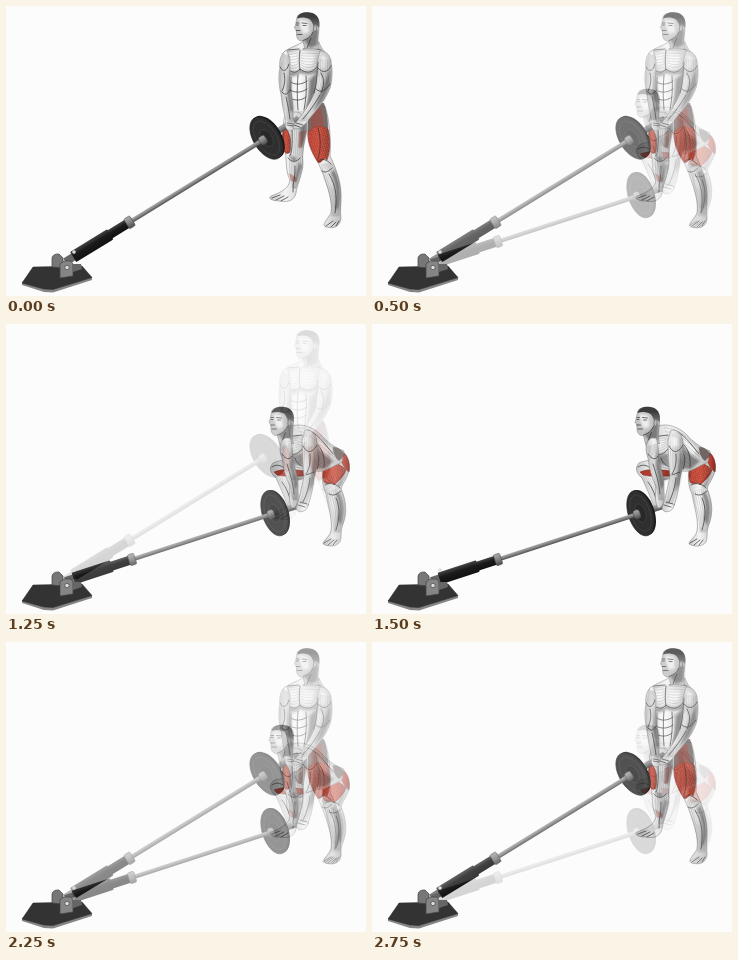
Write an HTML page that moves like this. It is 360x290 px and loops after 3000 ms.

```html
<!DOCTYPE html>
<html lang="en">
<head>
<meta charset="utf-8">
<title>Landmine squat</title>
<style>
  html, body { margin: 0; width: 100%; height: 100%; overflow: hidden; background: #fcfcfc; }
  svg { display: block; width: 100vw; height: 100vh; }
  .paper { fill: #fcfcfc; }
  .skin { fill: url(#skin); stroke: #888; stroke-width: .6; stroke-linejoin: round; }
  .fibre, .line { fill: none; stroke: #555; stroke-width: .4; opacity: .5; stroke-linecap: round; }
  .line { stroke: #2c2c2c; stroke-width: .9; opacity: .75; }
  .shade { fill: #222; opacity: .45; filter: url(#soft); }
  .light { fill: #fff; opacity: .7; filter: url(#soft); }
  .red { fill: url(#blood); stroke: #6f2b25; stroke-width: .5; }
  .mesh { fill: url(#mesh); }
  .shorts { fill: #5d4d4b; opacity: .8; }
  #standing { animation: mix 3s steps(6) infinite; }
  @keyframes mix { 0%, 100% { opacity: 1; } 50% { opacity: 0; } }
</style>
</head>
<body>
<svg viewBox="0 0 360 290" preserveAspectRatio="none">
  <defs>
    <linearGradient id="skin">
      <stop offset="0" stop-color="#c6c6c6"/>
      <stop offset=".4" stop-color="#f4f4f4"/>
      <stop offset="1" stop-color="#bdbdbd"/>
    </linearGradient>
    <linearGradient id="blood">
      <stop offset="0" stop-color="#a8372b"/>
      <stop offset=".5" stop-color="#c2402f"/>
      <stop offset="1" stop-color="#7d2c25"/>
    </linearGradient>
    <linearGradient id="hair" x2="0" y2="1">
      <stop offset=".3" stop-color="#3c3c3c"/>
      <stop offset="1" stop-color="#777"/>
    </linearGradient>
    <linearGradient id="steel" x2="0" y2="1">
      <stop offset="0" stop-color="#aaa"/>
      <stop offset=".45" stop-color="#888"/>
      <stop offset="1" stop-color="#4c4c4c"/>
    </linearGradient>
    <linearGradient id="rubber" x2="0" y2="1">
      <stop offset="0" stop-color="#454545"/>
      <stop offset=".4" stop-color="#1b1b1b"/>
      <stop offset="1" stop-color="#111"/>
    </linearGradient>
    <pattern id="mesh" width="3" height="3" patternUnits="userSpaceOnUse" patternTransform="rotate(25)">
      <path d="M0 0L3 3M3 0L0 3" stroke="#e58a78" stroke-width=".35"/>
    </pattern>
    <filter id="soft" x="-50%" y="-50%" width="200%" height="200%"><feGaussianBlur stdDeviation=".9"/></filter>

    <g id="head">
      <path class="skin" style="fill:#c4c4c4" d="M291 12C290 16 290 18 288.500 22L290.500 24L290.500 29C291 33 293 35.500 297 35L299 43L313 43C311 36 312 30 313 22C314 12 308 7 300 7C294 7 291 9 291 12Z"/>
      <path class="shade" d="M298 34C304 32 307 27 308 23L312 24L311 39L304 42Z"/>
      <path class="light" d="M293 13L302 15L303 26L297 28L294 20Z"/>
      <path fill="url(#hair)" d="M291 12.500C292 7 299 5.500 304 6.500C311 7.500 315 13 313 22L311 20L309 18.500L307.500 21C307 17 305 14 303 13C299 11 295 11 291 12.500Z"/>
      <path class="line" d="M290.500 17L293 17M296 17L301 17.500M290.500 19L292.500 19M297 19.500L300 19.500M290 24.500L294 24.500M291.500 28.500L296 28.500M297 34.500C303 33 306 29 307 26M305 32L301 42"/>
      <ellipse cx="309" cy="22.500" rx="1.600" ry="3" fill="#bbb" stroke="#555" stroke-width=".6"/>
    </g>

    <g id="barbell">
      <rect x="231" y="-3.200" width="37" height="6.400" rx="1" fill="url(#steel)"/>
      <ellipse cx="232.500" rx="13" ry="23.500" fill="#1a1a1a"/>
      <ellipse cx="230.500" rx="13" ry="23.500" fill="#2f2f2f" stroke="#222" stroke-width=".6"/>
      <ellipse cx="230.500" rx="10" ry="19" fill="none" stroke="#444" stroke-width=".7"/>
      <ellipse cx="230.500" rx="5.500" ry="9.500" fill="#282828" stroke="#444" stroke-width=".7"/>
      <rect x="74" y="-2.200" width="153" height="4.400" fill="url(#steel)"/>
      <rect x="223" y="-4.500" width="7" height="9" rx="2.500" fill="url(#steel)" stroke="#444" stroke-width=".5"/>
      <rect x="-3" y="-4" width="14" height="8" fill="#666"/>
      <rect x="47" y="-4.700" width="24" height="9.400" fill="url(#rubber)"/>
      <rect x="6" y="-6" width="43" height="12" rx="1" fill="url(#rubber)"/>
      <rect x="68" y="-5.700" width="7" height="11.400" rx="1.500" fill="url(#steel)" stroke="#444" stroke-width=".5"/>
    </g>

    <g id="base">
      <path fill="#858585" d="M16 276L47 283L86 271V274L47 286.500L38 286L16 279Z"/>
      <path fill="#333" stroke="#2a2a2a" stroke-width=".5" d="M27 261L76 260L86 271.500L47 283.500L38 283L16 277Z"/>
    </g>
    <g id="bracket">
      <path fill="#777" stroke="#444" stroke-width=".7" d="M46 261V252Q47 247.500 53 248L57 252L57 262Z"/>
      <path fill="#858585" stroke="#444" stroke-width=".7" d="M54 272V258L58 255H65L67 258V270Z"/>
      <path fill="#666" d="M66 258L75 258L76 263L67 266Z"/>
      <circle cx="61" cy="261.500" r="2.200" fill="#ddd" stroke="#444" stroke-width=".7"/>
      <circle cx="68" cy="246" r="1.800" fill="#ddd"/>
    </g>
  </defs>

  <g id="squatting">
    <rect class="paper" width="360" height="290"/>
    <use href="#base"/>
    <g>
      <path class="skin" d="M302 138C290 136 274 135 267 139C262 144 265 150 270 154C274 163 278 172 282 182L289 184C292 175 290 165 287 157L304 153Z"/>
      <path class="red" d="M268 148C277 144 291 146 300 147L301 152C290 152 278 153 271 151Z"/>
      <path class="shade" d="M286 153L300 153L288 158L291 174L287 180Z"/>
      <path class="fibre" d="M269 152C274 160 279 170 283 182" data-to="285 156 288 164 290 174 289 182"/>
      <path class="line" d="M266 143C270 140 275 141 278 144M276 158C281 164 283 172 286 180"/>
    </g>
    <g>
      <path class="skin" d="M325 124C337 123 344 134 343 147C341 155 336 160 335 165C341 178 341 190 337 200C334 207 336 214 334 218C330 223 322 223 317 220C317 216 324 213 325 207C327 196 322 182 320 170C315 160 316 148 318 138Z"/>
      <path class="red" d="M332 125C341 128 345 138 343 148C338 145 334 136 332 125Z"/>
      <path class="red" d="M320 142C326 136 335 140 340 146C338 152 333 157 328 161C326 156 322 162 318 158C316 151 317 146 320 142Z"/>
      <path class="mesh" d="M320 142C326 136 335 140 340 146L328 160L318 157Z"/>
      <path class="shade" d="M321 138C327 132 333 133 336 138L325 141ZM336 154L340 148L334 163L330 163ZM333 168C339 178 339 190 335 202L332 195C335 185 333 175 330 170Z"/>
      <path class="light" d="M323 164L329 168L329 190L325 182Z"/>
      <path class="fibre" d="M321 167C322 180 328 190 328 208" data-to="335 164 340 178 341 193 334 208"/>
      <path class="line" d="M319 161C324 158 331 160 334 164M323 170C329 173 332 169 335 167M330 174C335 185 333 196 330 206M318 219L325 215M322 221L328 216M327 221L331 216"/>
    </g>
    <g>
      <path class="skin" d="M286 102C296 99 306 103 314 110C321 118 328 123 338 127L336 138L320 146C312 149 305 146 298 144C288 145 280 138 277 128C273 120 271 115 278 111Z"/>
      <path class="shade" d="M311 120C315 128 322 134 328 137L319 145L306 145ZM284 132L296 129L298 142L288 141Z"/>
      <path class="shorts" d="M327 123C332 123 336 126 339 131L333 137C329 134 327 129 327 123Z"/>
      <path class="light" d="M279 117L292 115L290 125L281 126ZM312 112L325 125L321 131L313 124Z"/>
      <path class="fibre" d="M292 104C308 103 318 117 331 128" data-to="300 130 306 135 314 143 320 145"/>
      <path class="fibre" d="M277 117C282 114 290 116 297 112" data-to="280 130 286 134 293 131 298 124"/>
      <path class="line" d="M279 127C285 134 294 130 298 122M280 113L296 111M289 134C291 141 296 143 301 143M306 108C314 113 319 120 327 130M312 121C317 126 319 135 318 143M307 124C314 130 314 137 311 145"/>
    </g>
    <use href="#head" x="-25.500" y="76.500"/>
    <use href="#barbell" transform="translate(62 256.300) rotate(-18) scale(.942 1)"/>
    <g>
      <path class="skin" d="M279 114C273 118 273 126 276 134C277 144 280 154 284 162C283 172 283 178 286 184C291 184 293 176 292 168C292 156 290 146 287 138C286 130 287 120 284 114Z"/>
      <path class="fibre" d="M276 122C276 138 282 152 287 176" data-to="285 120 285 138 292 152 291 176"/>
      <path class="shade" d="M285 122L287 138L292 160L289 166L284 142Z"/>
      <path class="line" d="M276 130C280 136 284 136 286 132M281 140C284 150 287 158 288 170"/>
      <path class="skin" d="M299 106C307 105 312 113 311 123C312 136 310 146 308 154C307 166 304 177 301 184C298 189 291 189 290 184C293 176 296 162 298 152C297 142 296 126 296 116Z"/>
      <path class="fibre" d="M299 110C297 130 302 152 294 180" data-to="310 115 312 137 309 156 300 180"/>
      <path class="light" d="M299 112L306 113L306 122L300 123Z"/>
      <path class="shade" d="M309 122L311 138L307 160L303 168L306 145Z"/>
      <path class="line" d="M297 122C302 131 307 128 311 121M304 130C305 138 303 146 300 150M300 151L308 148M304 154C303 164 300 172 297 178M292 181L299 183M294 178L301 180"/>
    </g>
    <use href="#bracket"/>
  </g>

  <g id="standing">
    <rect class="paper" width="360" height="290"/>
    <use href="#base"/>
    <g>
      <path class="skin" d="M281 100C277 115 275 130 278 144C282 150 278 162 284 174C283 182 276 186 265 190C261 193 267 195 275 195C283 197 289 193 290 187C291 178 297 168 297 156C295 146 300 132 303 112Z"/>
      <path class="red" d="M278 122C283 123 286 132 284 146C281 149 278 147 277 142C276 136 276 128 278 122Z"/>
      <path class="mesh" d="M278 122C283 123 286 132 284 146L278 145Z"/>
      <path fill="#c4786c" opacity=".65" d="M293 126L301 124L296 141L292 142ZM283 167L291 172L290 176L285 175Z"/>
      <path class="shade" d="M294 118L302 114L299 130L296 142L294 142ZM293 156L296 160L290 178L288 174ZM283 150L291 152L288 156Z"/>
      <path class="fibre" d="M284 121C286 140 280 158 287 182" data-to="300 121 295 140 300 158 290 182"/>
      <path class="line" d="M286 123C286 134 287 142 284 150M282 152C286 157 291 156 294 152M289 160C290 170 286 178 287 186M266 192L274 189M270 194L278 190M275 195L282 191"/>
    </g>
    <g>
      <path class="skin" d="M300 100L319 100C324 115 325 135 324 150C329 160 335 175 335 189C335 198 334 205 335 213C333 221 328 223 320 221C315 219 321 214 325 207C327 195 321 180 317 168C312 155 303 140 301 122Z"/>
      <path class="shorts" d="M302 98L318 97C321 106 322 114 322 123C316 119 308 121 302 127Z"/>
      <path class="red" d="M302 127C307 119 317 119 322 123C325 134 324 147 321 154C317 149 315 161 311 155C306 147 301 136 302 127Z"/>
      <path class="mesh" d="M302 127C307 119 317 119 322 123C325 134 324 147 321 154L311 153C306 147 301 136 302 127Z"/>
      <path fill="#a5483d" opacity=".6" d="M305 105L315 102L318 119L305 122Z"/>
      <path class="light" d="M317 160L324 166L328 184L324 179Z"/>
      <path class="shade" d="M328 164C334 176 335 188 332 204L329 202C332 188 330 176 325 167Z"/>
      <path class="fibre" d="M315 158C319 176 327 190 326 210" data-to="326 158 335 174 337 193 333 210"/>
      <path class="line" d="M312 156C316 151 321 154 325 158M316 165C320 168 324 164 326 162M323 168C331 181 331 194 329 207M312 122C315 133 315 143 312 153M320 220L327 215M325 221L330 216M330 220L333 215"/>
    </g>
    <g>
      <path class="skin" d="M297 36C290 40 282 42 277 47C278 58 281 68 283 78C282 88 281 96 281 106L303 106C306 98 307 88 310 78C314 68 318 60 321 50C319 45 315 43 313 36Z"/>
      <path class="shade" d="M304 74L312 66L309 84L304 102L300 104L303 90ZM281 64C286 68 292 67 294 63C302 69 309 66 313 59L312 66C303 70 297 68 294 67C290 70 285 71 282 68Z"/>
      <path class="light" d="M282 48L291 47L291 58L284 60ZM297 48L309 49L306 59L297 60ZM287 72L295 71L294 96L287 94Z"/>
      <path class="fibre" d="M280 47C284 44 289 46 293 44" data-to="282 62 286 67 291 66 294 61"/>
      <path class="fibre" d="M294 45C301 44 310 44 319 47" data-to="295 61 301 67 308 65 314 57"/>
      <path class="fibre" d="M302 72C304 80 303 90 300 102" data-to="312 68 310 78 307 92 304 104"/>
      <path class="line" d="M294 44C293 52 293 58 294 64M281 62C286 68 291 67 294 63C302 69 309 66 313 57M292 69C291 81 291 92 292 104M285 71C285 83 284 94 286 104M300 70C301 83 300 93 298 104M285 76C288 79 296 79 301 75M284 84C289 87 295 87 301 83M284 92C289 95 295 95 300 91M282 44L293 43M297 43C303 42 309 42 315 44"/>
    </g>
    <use href="#head"/>
    <use href="#barbell" transform="translate(62 254.200) rotate(-31.600) scale(1.011 1)"/>
    <g>
      <path class="skin" d="M281 44C275 47 273 54 274 62C272 70 273 80 275 88C276 98 278 108 280 114C278 119 280 125 285 125C290 123 290 118 287 113C287 103 287 92 284 84C283 74 284 62 284 54Z"/>
      <path class="fibre" d="M277 48C273 68 273 88 282 116" data-to="283 50 282 68 286 88 287 116"/>
      <path class="shade" d="M282 64L284 84L287 104L284 106L281 86Z"/>
      <path class="line" d="M274 61C277 67 281 65 283 58M278 67C280 75 278 81 276 85M276 86C279 90 282 88 284 84M280 91C282 99 283 106 284 113"/>
      <path class="skin" d="M314 45C321 45 325 50 325 57C327 66 326 74 324 82C320 93 311 104 303 113C300 118 296 122 290 123C285 123 287 118 291 115C297 108 304 98 308 88C311 78 311 64 311 56Z"/>
      <path class="light" d="M316 49L321 53L319 63L314 61ZM312 70L316 71L314 82L311 84Z"/>
      <path class="fibre" d="M313 53C312 80 312 92 294 115" data-to="325 54 326 82 319 96 300 115"/>
      <path class="shade" d="M324 62L324 78L317 94L307 106L315 87Z"/>
      <path class="line" d="M312 62C317 68 322 66 325 60M310 83C315 88 320 84 324 78M315 67C319 74 318 80 315 87M312 56C311 68 311 78 308 87M314 89C309 98 303 106 297 113M288 119L294 121M290 117L297 119M281 119L287 120M281 117L287 118"/>
    </g>
    <use href="#bracket"/>
  </g>
</svg>
<script>
  // Fill each muscle with strands interpolated between its two edge curves.
  const STRANDS = 8;
  const numbers = text => text.match(/[\d.]+/g).map(Number);
  for (const muscle of document.querySelectorAll('[data-to]')) {
    const from = numbers(muscle.getAttribute('d'));
    const to = numbers(muscle.dataset.to);
    let strands = '';
    for (let i = 0; i < STRANDS; i++) {
      const points = from.map((v, k) => v + (to[k] - v) * i / (STRANDS - 1));
      strands += `M${points.slice(0, 2)}C${points.slice(2)}`;
    }
    muscle.setAttribute('d', strands);
  }
</script>
</body>
</html>
```
